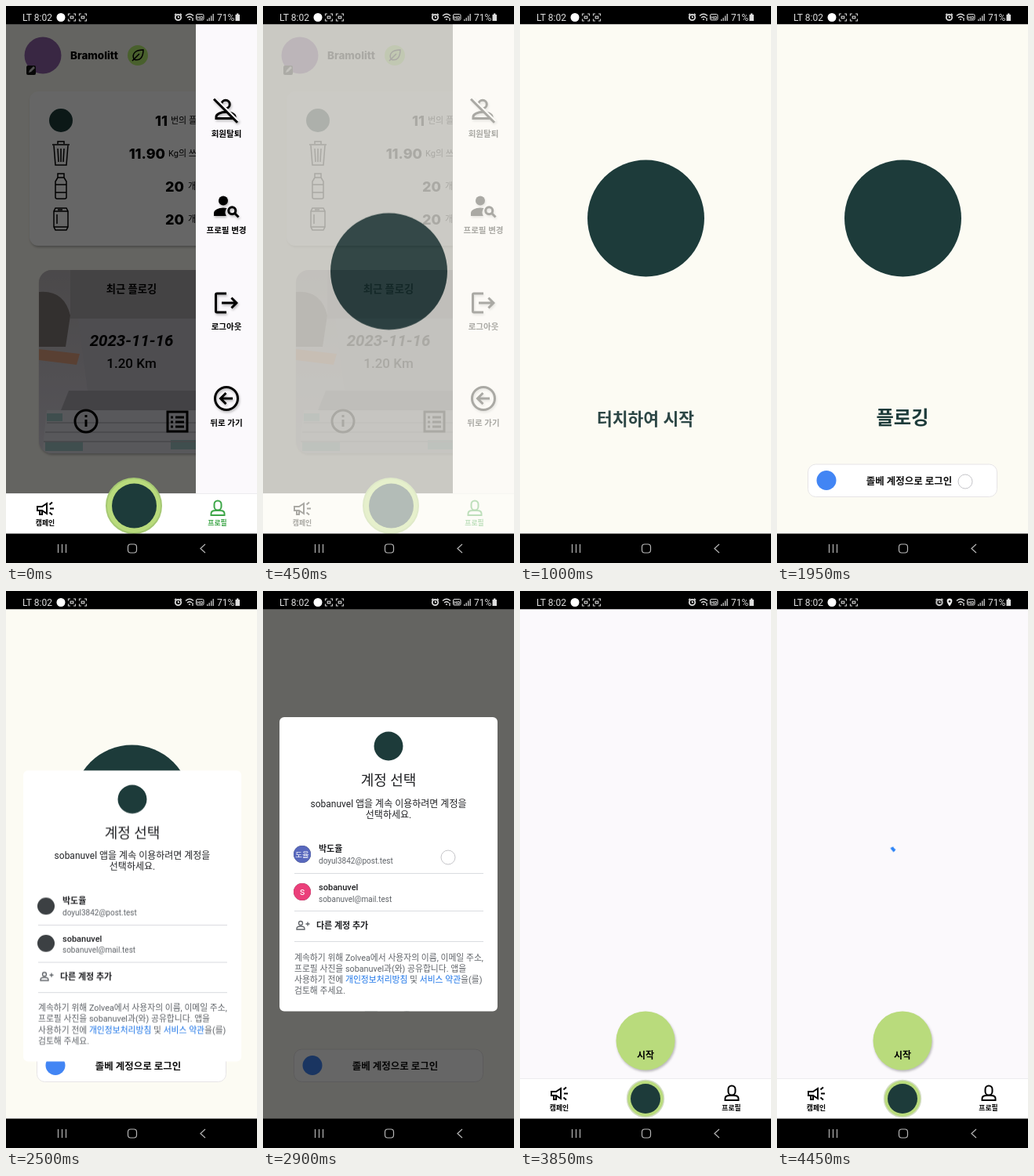
Recreate the animation shown at these times as an HTML page. Size 320 px wide and 711 px high, loop 4.5 s.

```html
<!DOCTYPE html>
<html lang="ko">
<head>
<meta charset="utf-8">
<title>앱 로그인</title>
<style>
html, body { margin: 0; width: 100%; height: 100%; overflow: hidden; background: #000; }
svg { display: block; width: 100vw; height: 100vh; font-family: Roboto, "Noto Sans CJK KR", sans-serif; }
.c { text-anchor: middle; }
.b { font-weight: 700; }
.num { font: 800 18px Inter, sans-serif; text-anchor: end; }
.unit { font-size: 11px; }
.label { font-size: 10.5px; font-weight: 700; text-anchor: middle; }
.tab { font-size: 8.8px; font-weight: 900; text-anchor: middle; fill: currentColor; }
.mail { font-size: 10px; fill: #5f6368; }
.terms { font-size: 10.8px; fill: #5f6368; }
.link { fill: #1a73e8; }
.line { fill: none; stroke: currentColor; stroke-width: 2; }
.thin { stroke-width: 1.5; }
.thick { stroke-width: 3; }
.soft { filter: drop-shadow(1px 2px 1.5px #0004); }
.mark { fill: #1d3b3a; }
.lime { fill: #b9db7c; }
.touch { fill: #fffc; stroke: #c4c4c8; }

/* Values hold between keyframes; ramps advance every 50 ms. */
.a { animation: 4500ms step-end infinite; }
#tapLogout { animation-name: tapLogout; }
#login { animation-name: login; }
#logo { animation-name: logo; }
#hint { animation-name: hint; }
#entry { animation-name: entry; }
#tapEntry { animation-name: tapEntry; }
#dim { animation-name: dim; }
#dialog { animation-name: dialog; transform-origin: 160px 536px; }
#faces { animation-name: faces; }
#tapRow { animation-name: tapRow; }
#main { animation-name: main; }
#spin { animation-name: spin; transform-origin: 160px 320px; }
#pin { animation-name: pin; }
#alarm { animation-name: alarm; }

@keyframes tapLogout { 0% { opacity: 0 } 1.11% { opacity: 1 } 4.44% { opacity: 0 } }
@keyframes login {
  0% { opacity: 0 }
  8.88% { opacity: .35; animation-timing-function: steps(2) }
  11.11%, 100% { opacity: 1 }
}
@keyframes logo {
  0% { transform: translateY(78px) }
  8.88% { transform: translateY(78px); animation-timing-function: steps(5) }
  14.44% { transform: translateY(27px); animation-timing-function: steps(6) }
  21.11%, 100% { transform: none }
}
@keyframes hint {
  0% { opacity: 0 }
  11.11% { opacity: 0; animation-timing-function: steps(3) }
  14.44% { opacity: .35; animation-timing-function: steps(7) }
  22.22% { opacity: 1 }
  32.22% { opacity: .7; animation-timing-function: steps(2) }
  34.44%, 100% { opacity: 0 }
}
@keyframes entry {
  0% { opacity: 0 }
  33.33% { opacity: .2; animation-timing-function: steps(4) }
  37.77%, 100% { opacity: 1 }
}
@keyframes tapEntry { 0% { opacity: 0 } 43.33% { opacity: 1 } 48.88% { opacity: .5 } 50% { opacity: 0 } }
@keyframes dim {
  0% { opacity: 0 }
  55.55% { opacity: 0; animation-timing-function: steps(4) }
  60% { opacity: 1 }
  68.88% { opacity: 1; animation-timing-function: steps(4) }
  73.33%, 100% { opacity: 0 }
}
@keyframes dialog {
  0% { opacity: 0; transform: translate(1px, 300px) scaleY(.989) }
  53.33% { opacity: 1; transform: translate(1px, 300px) scaleY(.989); animation-timing-function: steps(2) }
  55.55% { opacity: 1; transform: translate(1px, 64px) scaleY(.989); animation-timing-function: steps(3) }
  58.88% { opacity: 1; transform: none }
  68.88% { opacity: 1; transform: none; animation-timing-function: steps(3) }
  72.22%, 100% { opacity: 0; transform: none }
}
@keyframes faces { 0% { opacity: 0 } 58.88%, 100% { opacity: 1 } }
@keyframes tapRow { 0% { opacity: 0 } 64.44% { opacity: 1 } 67.77% { opacity: 0 } }
@keyframes main {
  0% { opacity: 0 }
  77.77% { opacity: .2; animation-timing-function: steps(3) }
  81.11%, 100% { opacity: 1 }
}
@keyframes spin {
  0% { opacity: 0; transform: rotate(-220deg); stroke-dasharray: 6 97 }
  87.77% { opacity: 1; transform: rotate(-220deg); stroke-dasharray: 6 97; animation-timing-function: steps(5) }
  93.33% { opacity: 1; transform: rotate(-70deg); stroke-dasharray: 45 97; animation-timing-function: steps(5) }
  98.88%, 100% { opacity: 1; transform: rotate(130deg); stroke-dasharray: 6 97 }
}
@keyframes pin { 0% { opacity: 0 } 87.77%, 100% { opacity: 1 } }
@keyframes alarm { 0% { transform: none } 87.77%, 100% { transform: translateX(-12.5px) } }
</style>
</head>
<body>
<svg viewBox="0 0 320 711">
  <defs>
    <g id="scan" fill="none" stroke="#ccc" stroke-width="1.2">
      <path d="M-4.5-2v-2.5h2.5M2-4.5h2.5v2.5M4.5 2v2.5h-2.5M-2 4.5h-2.5v-2.5"/>
      <rect x="-1.8" y="-1.3" width="3.6" height="2.6"/>
    </g>
    <g id="tabs">
      <rect y="622" width="320" height="52" fill="#fff"/>
      <path d="M0 622.5H320" stroke="#ececee"/>
      <path class="line" transform="translate(38 630)" d="M2 9h6l6-4v13l-6-4H2zM5 14v5h3v-5M18 11.5h5M17.5 6.5l3.5-3M17.5 16.5l3.5 3"/>
      <text class="tab" x="50" y="663">캠페인</text>
    </g>
    <g id="profile">
      <path class="line" transform="translate(258 629)" d="M7.5 10V7a4.500 4.500 0 0 1 9 0v3a4.500 4.500 0 0 1-9 0zM3.500 21v-2c0-3 3-4 5.500-4h6c2.500 0 5.500 1 5.500 4v2z"/>
      <text class="tab" x="269.5" y="663">프로필</text>
    </g>
    <clipPath id="photo"><rect x="42" y="337" width="236" height="234" rx="16"/></clipPath>
    <linearGradient id="room" x2="0" y2="1">
      <stop offset="0" stop-color="#bcb7ba"/>
      <stop offset="1" stop-color="#d8d4df"/>
    </linearGradient>
  </defs>

  <g id="home">
    <rect width="320" height="711" fill="#fcfbf3"/>
    <circle cx="47" cy="63" r="23.5" fill="#8f62a8"/>
    <rect x="26" y="76" width="12" height="12" rx="2" fill="#111"/>
    <path d="M29 85l1-3 5-5 2 2-5 5z" fill="#ccc"/>
    <text x="82" y="68" style="font:800 13.5px Inter,sans-serif">Bramolitt</text>
    <circle cx="168" cy="63" r="13" fill="#b8f070"/>
    <path class="line thin" d="M161 70l9-9M163 68c-3-8 3-12 12-12 0 9-4 15-12 12z"/>

    <rect class="soft" x="30" y="109" width="260" height="197" rx="11" fill="#fff"/>
    <circle class="mark" cx="70" cy="146" r="15"/>
    <g class="line thin">
      <path d="M59 177h22M66 176v-3h8v3M61 178l2 25h14l2-25M66 182l1 17M70 182v17M74 182l-1 17"/>
      <path d="M66 214h8v5h-8zM66 219l-3 5v20q0 2 2 2h10q2 0 2-2v-20l-3-5M63 228h14M63 238h14"/>
      <path d="M63 258h14l2 4v20l-2 4h-14l-2-4v-20zM61 262h18M61 282h18M66 260h6M65 266v12"/>
    </g>
    <text class="num" x="206" y="153">11</text><text class="unit" x="210" y="150">번의 플로깅</text>
    <text class="num" x="203" y="195">11.90</text><text class="unit" x="207" y="192">Kg의 쓰레기</text>
    <text class="num" x="227" y="237">20</text><text class="unit" x="232" y="234">개의 병</text>
    <text class="num" x="227" y="279">20</text><text class="unit" x="232" y="276">개의 캔</text>

    <rect class="soft" x="42" y="337" width="236" height="234" rx="16" fill="#ddd"/>
    <g clip-path="url(#photo)">
      <rect x="42" y="337" width="236" height="234" fill="url(#room)"/>
      <path d="M82 337h196v62H82z" fill="#aaa7aa"/>
      <path d="M42 365q32-3 40 30l-6 40H42z" fill="#807875"/>
      <path d="M92 399h186v92H104z" fill="#c3c0ca"/>
      <path d="M42 438l52 6-4 14-48-6z" fill="#e0a080"/>
      <path d="M80 491h198v25H70z" fill="#a9a6ae"/>
      <path d="M52 516h226v55H46z" fill="#dedee4"/>
      <path d="M52 520h20v10H52zM50 556h48v12H50zM210 554h50v12h-50z" fill="#9fc4c4"/>
      <path d="M52 532H278M50 544H278M48 556H278" stroke="#b3b2ba" stroke-width="1.5"/>
    </g>
    <text class="c b" x="160" y="366" font-size="13.3">최근 플로깅</text>
    <text class="c b" x="160" y="434" font-size="20.5" font-style="italic">2023-11-16</text>
    <text class="c" x="160" y="462" font-size="17" font-weight="500">1.20 Km</text>
    <g class="line thick">
      <circle cx="102" cy="530" r="14"/>
      <path d="M102 528v9M102 522v3"/>
      <rect x="206" y="518" width="25" height="25"/>
      <path d="M210 525h3M216 525h11M210 531h3M216 531h11M210 537h3M216 537h11"/>
    </g>
    <rect y="23" width="320" height="600" opacity=".6"/>

    <rect x="242" y="23" width="78" height="600" fill="#fbf9fc"/>
    <g class="soft">
      <g transform="translate(262 115) scale(1.5)">
        <g class="line"><circle cx="12" cy="7" r="3.5"/><path d="M4 19v-1.5c0-2 4-4 8-4s8 2 8 4V19z"/></g>
        <path d="M3 1.5l20 20" stroke="#fbf9fc" stroke-width="2"/>
        <path class="line" d="M2 2.5l20 20"/>
      </g>
      <g transform="translate(262 238) scale(1.5)">
        <circle cx="10" cy="7" r="4"/>
        <path d="M10 13c-4 0-8 2-8 4.5V20h10.5a6 6 0 0 1 .5-6.7z"/>
        <g class="line"><circle cx="17.5" cy="15.5" r="3"/><path d="M19.5 17.5l3.5 3.5"/></g>
      </g>
      <path transform="translate(263 361) scale(1.5)" d="M17 7l-1.4 1.4L18.2 11H8v2h10.2l-2.6 2.6L17 17l5-5zM4 5h8V3H4a2 2 0 0 0-2 2v14a2 2 0 0 0 2 2h8v-2H4z"/>
      <g class="line thick"><circle cx="281" cy="501" r="14.5"/><path d="M289 501h-15M280.5 494l-7 7 7 7"/></g>
    </g>
    <text class="label" x="281" y="167">회원탈퇴</text>
    <text class="label" x="281" y="290">프로필 변경</text>
    <text class="label" x="281" y="413">로그아웃</text>
    <text class="label" x="281" y="536">뒤로 가기</text>

    <use href="#tabs"/>
    <use href="#profile" color="#3da648"/>
    <circle class="lime" cx="163" cy="638" r="35" stroke="#a5c873" stroke-width="2"/>
    <circle class="mark" cx="163.5" cy="638" r="28.5"/>
    <circle id="tapLogout" class="touch a" cx="284" cy="381" r="9"/>
  </g>

  <g id="login" class="a">
    <rect width="320" height="711" fill="#fcfbf3"/>
    <circle id="logo" class="mark a" cx="160.5" cy="271" r="74.5"/>
    <text id="hint" class="c b a" x="160" y="535" font-size="21.5" fill="#2c4645">터치하여 시작</text>
    <g id="entry" class="a">
      <text class="c" x="160" y="533.5" font-size="24.3" font-weight="900" fill="#1d3b3a">플로깅</text>
      <rect x="39.5" y="585" width="241" height="41.5" rx="10" fill="#fff" stroke="#e6e4e6"/>
      <circle cx="63" cy="605.5" r="12.5" fill="#4285f4"/>
      <text class="c b" x="168.5" y="610.5" font-size="12.5" fill="#111">졸베 계정으로 로그인</text>
      <circle id="tapEntry" class="touch a" cx="240" cy="607" r="9"/>
    </g>
    <rect id="dim" class="a" y="23" width="320" height="651" fill="#0009"/>

    <g id="dialog" class="a">
      <rect x="21" y="161" width="278" height="375.5" rx="6" fill="#fff"/>
      <circle class="mark" cx="160" cy="198" r="18.5"/>
      <g fill="#202124">
        <text class="c" x="160" y="248" font-size="18">계정 선택</text>
        <g class="c" font-size="12">
          <text x="160" y="275.5">sobanuvel 앱을 계속 이용하려면 계정을</text>
          <text x="160" y="289.5">선택하세요.</text>
        </g>
        <g font-size="11">
          <text class="b" x="71" y="333">박도율</text>
          <text x="71" y="382" font-weight="500">sobanuvel</text>
          <text class="b" x="68" y="431">다른 계정 추가</text>
        </g>
      </g>
      <text class="mail" x="71" y="348">doyul3842@post.test</text>
      <text class="mail" x="71" y="396.5">sobanuvel@mail.test</text>
      <path d="M40 360.5H281M40 408.5H281M40 447.5H281" stroke="#dadce0"/>
      <g fill="#3c4043"><circle cx="50" cy="336" r="11"/><circle cx="50" cy="384" r="11"/></g>
      <g id="faces" class="a c" fill="#fff">
        <circle cx="50" cy="336" r="11" fill="#5868bd"/><text x="50" y="339.5" font-size="9.5">도율</text>
        <circle cx="50" cy="384" r="11" fill="#eb3f7a"/><text x="50" y="388" font-size="13">s</text>
      </g>
      <g fill="none" stroke="#5f6368" stroke-width="1.3">
        <path d="M43 432v-1c0-4 10-4 10 0v1zM54.5 425h5M57 422.5v5"/>
        <circle cx="48" cy="424" r="2.5"/>
      </g>
      <g class="terms">
        <text x="40" y="471.5">계속하기 위해 Zolvea에서 사용자의 이름, 이메일 주소,</text>
        <text x="40" y="485.5">프로필 사진을 sobanuvel과(와) 공유합니다. 앱을</text>
        <text x="40" y="500">사용하기 전에 <tspan class="link">개인정보처리방침</tspan> 및 <tspan class="link">서비스 약관</tspan>을(를)</text>
        <text x="40" y="514">검토해 주세요.</text>
      </g>
      <circle id="tapRow" class="touch a" cx="236" cy="340" r="9"/>
    </g>
  </g>

  <g id="main" class="a">
    <rect width="320" height="711" fill="#fbf9fc"/>
    <circle id="spin" class="a" cx="160" cy="320" r="15.5" fill="none" stroke="#2b83f6" stroke-width="4"/>
    <circle class="lime soft" cx="160" cy="574" r="37.5"/>
    <text class="c b" x="160" y="597" font-size="12">시작</text>
    <use href="#tabs"/>
    <use href="#profile"/>
    <circle class="lime" cx="160" cy="648" r="23.5" stroke="#d3dcc3" stroke-width="1.5"/>
    <circle class="mark" cx="160" cy="648" r="19"/>
  </g>

  <g id="system">
    <path d="M0 0h320v23.3H0zM0 673.6h320V711H0z"/>
    <g fill="#ddd" font-size="12">
      <text x="21" y="18.5">LT 8:02</text>
      <text x="269" y="18.5">71%</text>
      <circle cx="70" cy="14.5" r="5.5" fill="#fff"/>
      <path d="M292.5 11h1.5v-1.5h2.5V11h1.5v8h-5.5z"/>
      <path d="M256 17h1.5v2H256zM258.5 15h1.5v4h-1.5zM261 12.5h1.5V19H261zM263.5 10h1.5v9h-1.5z" opacity=".8"/>
    </g>
    <use href="#scan" x="84" y="14.5"/>
    <use href="#scan" x="98" y="14.5"/>
    <g fill="none" stroke="#ddd" stroke-width="1.3">
      <g id="alarm" class="a">
        <circle cx="219.5" cy="14.5" r="3.7" stroke-width="1.8"/>
        <path d="M215 11.5l2-1.8M224 11.5l-2-1.8M219.5 12.5v2h1.5"/>
      </g>
      <path d="M229 12.5q5-4.5 10 0M231 15q3-2.5 6 0M233 17.5q1-1 2 0M238 15v4"/>
      <rect x="242.5" y="10.5" width="9.5" height="7.5" rx="1.5" stroke-width="1"/>
    </g>
    <text class="c b" x="247.3" y="16.5" font-size="6" fill="#ddd">HD</text>
    <path id="pin" class="a" d="M220 19.5c-5-6-4-10 0-10s5 4 0 10zM220 12a1.3 1.3 0 1 0 .01 0z" fill="#eee" fill-rule="evenodd"/>
    <g fill="none" stroke="#b5b5b5" stroke-width="1.2">
      <path d="M66.5 687v11M71.5 687v11M76.5 687v11M254 687l-6 5.5 6 5.5"/>
      <rect x="155.5" y="687" width="11" height="11" rx="3.5"/>
    </g>
  </g>
</svg>
</body>
</html>
```
